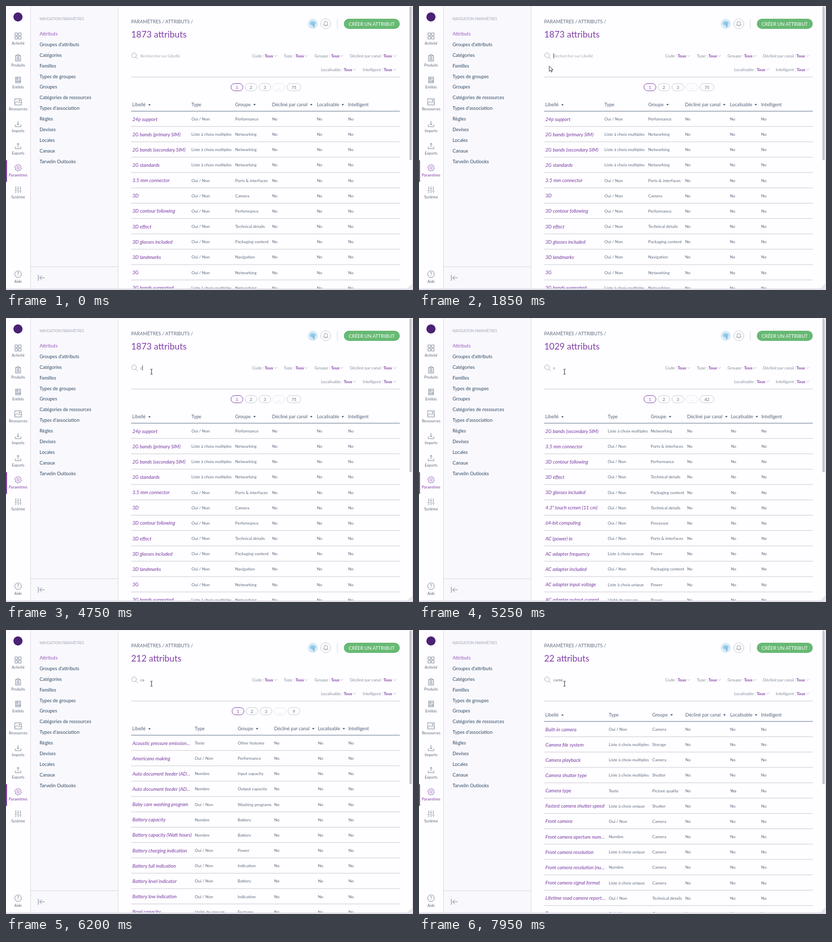
Write an HTML page that moves like this. It is 800 px wide and 558 px high and loops after 8 s.

```html
<!DOCTYPE html>
<html lang="fr">
<head>
<meta charset="utf-8">
<title>Attributs</title>
<style>
  html, body { margin: 0; width: 100%; height: 100%; overflow: hidden; background: #fefdff; }
  svg { display: block; width: 800px; height: 558px; font-family: Lato, "Open Sans", sans-serif; }
</style>
</head>
<body>
<svg id="stage" viewBox="0 0 800 558" xmlns="http://www.w3.org/2000/svg"></svg>
<script>
const NAVY = '#2f4a62', GREY = '#5f6d81', PALE = '#a3abb8', PURPLE = '#8040a8', RULE = '#c9cad3';

const text = (x, y, s, size, fill, attrs = '') =>
  `<text x="${x}" y="${y}" font-size="${size}" fill="${fill}" ${attrs}>${s}</text>`;
const rect = (x, y, w, h, fill, attrs = '') =>
  `<rect x="${x}" y="${y}" width="${w}" height="${h}" fill="${fill}" ${attrs}/>`;
const path = (d, stroke, width = 1, attrs = '') =>
  `<path d="${d}" fill="none" stroke="${stroke}" stroke-width="${width}" ${attrs}/>`;
const circle = (x, y, r, fill, attrs = '') =>
  `<circle cx="${x}" cy="${y}" r="${r}" fill="${fill}" ${attrs}/>`;
const MIDDLE = 'text-anchor="middle"';

// Icons are drawn around their own centre
const gear = Array.from({ length: 32 }, (_, i) => {
  const a = (i + .5) / 32 * Math.PI * 2, r = i % 4 < 2 ? 6.6 : 5.2;
  return (r * Math.cos(a)).toFixed(1) + ' ' + (r * Math.sin(a)).toFixed(1);
}).join('L');
const tray = 'M-5.5 1.5V5.5H5.5V1.5';
const menu = [
  ['Activité', 'M-6-6h5v5h-5zM1-6h5v5h-5zM-6 1h5v5h-5zM1 1h5v5h-5z'],
  ['Produits', 'M-2-5H-5V6H5V-5H2M-2-6.5H2V-3.5H-2zM-3-1H3M-3 1.3H3M-3 3.6H3'],
  ['Entités', 'M-5-5.5H5V5.5H-5zM-3-3.5h2.5v2.5h-2.5zM1-3.5H3.5M1-1H3.5M-3 1.5h2v2h-2zM1 1.5h2.5v2H1z'],
  ['Ressources', 'M-6.5-6H6.5V6H-6.5zM-6.5 3L-2-1 1 2 3.5 0 6.5 3M2-3.5h1.5v1.5H2z'],
  ['Imports', tray + 'M0-5.5V2M-2.5-.5L0 2 2.5-.5'],
  ['Exports', tray + 'M0 2.5V-5M-2.5-2.5L0-5 2.5-2.5'],
  ['Paramètres', `M${gear}ZM2.3 0A2.3 2.3 0 1 1-2.3 0A2.3 2.3 0 1 1 2.3 0`],
  ['Système', 'M-4.5-6.5V0M-4.5 3V6.5M-6.5 1.5H-2.5M0-6.5V-4M0-1V6.5M-2-2.5H2M4.5-6.5V1M4.5 4V6.5M2.5 2.5H6.5'],
];
const nav = ['Attributs', "Groupes d'attributs", 'Catégories', 'Familles', 'Types de groupes', 'Groupes',
  'Catégories de ressources', "Types d'association", 'Règles', 'Devises', 'Locales', 'Canaux', 'Tarvelin Outlooks'];
const filters = [
  ['Code', 484, 508.5, 530, 101], ['Type', 546, 569, 590, 101], ['Groupe', 606.5, 639, 660, 101],
  ['Décliné par canal', 676, 742, 764, 101], ['Localisable', 619.5, 664, 685, 128], ['Intelligent', 701.5, 742.5, 764, 128],
];

function sidebar() {
  const item = ([label, d], y) => {
    const color = label === 'Paramètres' ? PURPLE : GREY;
    return path(d, color, .8, `transform="translate(23.7 ${y})"`) + text(23.8, y + 16.8, label, 7.4, color, MIDDLE);
  };
  return rect(48, 0, 172, 556, '#f9f8fd')
    + path('M48.3 0V556M220.3 0V556M48 512.3H220', '#d9d7e0')
    + circle(23.5, 21.5, 9, '#4b2173')
    + rect(0, 303, 2, 42.5, PURPLE)
    + menu.map((m, i) => item(m, 59 + 43.15 * i)).join('')
    + circle(23.7, 527, 6.5, 'none', `stroke="${GREY}" stroke-width=".8"`)
    + text(23.7, 530.2, '?', 9, GREY, MIDDLE) + text(23.8, 544, 'Aide', 7.4, GREY, MIDDLE)
    + text(66, 28.4, 'NAVIGATION PARAMÈTRES', 6.875, PALE)
    + nav.map((s, i) => text(66, 57.8 + 20.93 * i, s, 9.3, i ? NAVY : '#9a58be')).join('')
    + path('M63.5 528V540M76 534H66M70.5 529.5L66 534L70.5 538.5', GREY, .8);
}

function header() {
  const filter = ([name, x, tx, cx, y]) => text(x, y, name + ' :', 8.125, '#828d9e')
    + text(tx, y, 'Tous', 8, PURPLE, 'font-weight="700"')
    + path(`M${cx - 3} ${y - 4.6}l3 3 3-3`, PALE, .8);
  return text(246, 33.8, 'PARAMÈTRES / ATTRIBUTS /', 9.2, GREY)
    + circle(603, 35, 10, '#d6ebf7')
    + `<ellipse cx="603" cy="34" rx="5.5" ry="4" fill="#8fc6e5"/>` + rect(603.5, 36, 2.6, 5.5, '#7ab5d8')
    + circle(628.5, 35, 9.8, 'none', `stroke="${RULE}"`)
    + path('M624 37.8H633L631.8 36V33.5A3.3 3.3 0 0 0 625.2 33.5V36ZM627.3 39.5H629.7', GREY, .7)
    + path('M651.3 25.5V45', '#d5d5de')
    + rect(664, 25, 110, 20, '#67b974', 'rx="10"')
    + text(718.8, 38.5, 'CRÉER UN ATTRIBUT', 9.3, '#fff', MIDDLE)
    + circle(251.7, 96.8, 4.6, 'none', `stroke="${PALE}"`) + path('M255 100.2L259 104.2', PALE)
    + filters.map(filter).join('')
    + path('M246 139.5H774', RULE);
}

const types = { O: 'Oui / Non', M: 'Liste à choix multiples', U: 'Liste à choix unique', T: 'Texte', N: 'Nombre', D: 'Unité de mesure' };
const narrow = [364.5, 450.5, 523, 611, 672.5], wide = [371, 455.5, 527, 613, 673], mid = [373, 458.5, 523.5, 611.5, 672.5];

// Each result: time shown, count, pages, column places, rows of "label|type|group"
const results = [
  { at: 0, count: 1873, pages: [1, 2, 3, '...', 75], cols: narrow, rows: `24p support|O|Performance
2G bands (primary SIM)|M|Networking
2G bands (secondary SIM)|M|Networking
2G standards|M|Networking
3.5 mm connector|O|Ports &amp; interfaces
3D|O|Camera
3D contour following|O|Performance
3D effect|O|Technical details
3D glasses included|O|Packaging content
3D landmarks|O|Navigation
3G|O|Networking
3G bands supported|M|Networking` },
  { at: 5200, count: 1029, pages: [1, 2, 3, '...', 42], cols: wide, rows: `2G bands (secondary SIM)|M|Networking
3.5 mm connector|O|Ports &amp; interfaces
3D contour following|O|Performance
3D effect|O|Technical details
3D glasses included|O|Packaging content
4.3" touch screen (11 cm)|O|Technical details
64-bit computing|O|Processor
AC (power) in|O|Ports &amp; interfaces
AC adapter frequency|U|Power
AC adapter included|O|Packaging content
AC adapter input voltage|U|Power
AC adapter output current|D|Power` },
  { at: 6100, count: 212, pages: [1, 2, 3, '...', 9], cols: wide, rows: `Acoustic pressure emission…|T|Other features
Americano making|O|Performance
Auto document feeder (AD…|N|Input capacity
Auto document feeder (AD…|N|Output capacity
Baby care washing program|O|Washing programs
Battery capacity|N|Battery
Battery capacity (Watt hours)|N|Battery
Battery charging indication|O|Power
Battery full indication|O|Indication
Battery level indicator|O|Battery
Battery low indication|O|Indication
Bowl capacity|D|Features` },
  { at: 7000, count: 26, pages: [1, 2], cols: mid, rows: `Built-in camera|O|Camera
Camcorder media type|M|Storage
Camcorder tape type|M|Storage
Camcorder type|U|Camera
Camera file system|M|Storage
Camera playback|M|Camera
Camera shutter type|M|Shutter
Camera type|T|Picture quality
Camper/Caravan|O|GPS type
Fastest camera shutter speed|U|Shutter
Front camera|O|Camera
Front camera aperture num…|N|Camera` },
  { at: 7950, count: 22, pages: [], cols: mid, rows: `Built-in camera|O|Camera
Camera file system|M|Storage
Camera playback|M|Camera
Camera shutter type|M|Shutter
Camera type|T|Picture quality
Fastest camera shutter speed|U|Shutter
Front camera|O|Camera
Front camera aperture num…|N|Camera
Front camera resolution|U|Camera
Front camera resolution (nu…|N|Camera
Front camera signal format|U|Camera
Lifetime road camera report…|O|Technical details
Rear camera|O|Camera` },
];

function pager(pages) {
  const width = p => p > 9 ? 28.5 : 24.4, gap = 3.1;
  let x = 511 - (pages.reduce((sum, p) => sum + width(p) + gap, 0) - gap) / 2;
  return pages.map(p => {
    const w = width(p), dots = p === '...';
    const edge = p === 1 ? PURPLE : dots ? '#e6e6ec' : RULE;
    const out = rect(x + .5, 152.4, w - 1, 14.2, 'none', `rx="7.1" stroke="${edge}"`)
      + text(x + w / 2, 162.6, p, 8.25, p === 1 ? PURPLE : dots ? RULE : GREY, MIDDLE);
    x += w + gap;
    return out;
  }).join('');
}

function table({ count, pages, cols, rows }) {
  const top = pages.length ? 0 : -27, step = 30.15;
  const down = x => `<path d="M${x - 2.5} ${192.8 + top}h5l-2.5 2.7z" fill="${NAVY}"/>`;
  const row = (line, i) => {
    const [label, type, group] = line.split('|'), y = 225 + top + i * step;
    const cells = [types[type], group, 'No', label === 'Camera type' ? 'Yes' : 'No', 'No'];
    return text(248.5, y + .5, label, 9.65, '#783aa2', 'font-style="italic"')
      + cells.map((s, c) => text(cols[c], y, s, 8.17, GREY, s === 'Yes' ? 'font-weight="700"' : '')).join('')
      + path(`M246 ${(236.7 + top + i * step).toFixed(2)}H774`, RULE);
  };
  return text(246, 62, count + ' attributs', 17.4, PURPLE) + pager(pages)
    + ['Libellé', 'Type', 'Groupe', 'Décliné par canal', 'Localisable', 'Intelligent']
      .map((s, i) => text(i ? cols[i - 1] : 248, 196.6 + top, s, 9.25, '#52637a')).join('')
    + `<path d="M279.5 ${195.1 + top}h5l-2.5-2.7z" fill="${NAVY}"/>`
    + down(cols[1] + 38) + down(cols[2] + 77) + down(cols[3] + 51)
    + path(`M246 ${206.7 + top}H774`, '#5f738a')
    + rows.split('\n').map(row).join('');
}

const stage = document.getElementById('stage');
stage.innerHTML = rect(0, 0, 800, 558, '#fefdff') + sidebar() + header()
  + results.map(r => `<g class="result">${table(r)}</g>`).join('')
  + text(264, 100.8, 'Rechercher sur Libellé', 8.125, PALE, 'id="hint"')
  + text(264, 100.8, '', 8.125, GREY, 'id="query"')
  + rect(0, 93, .9, 10, '#3c4552', 'id="caret"')
  + rect(793, 1, 4.5, 302, '#c5c4cb', 'rx="2"')
  + rect(0, 555, 800, 3, '#e1dfe7') + rect(798.5, 0, 1.5, 558, '#e1dfe7') + rect(0, 0, 800, 1, '#eeedf2')
  + path('M791 554.5L798 547.5M794.5 554.5L798 551', '#a5a4ab', .9)
  + `<path id="arrow" d="M0 0V10.5L2.5 8.2 4.2 12 5.9 11.2 4.2 7.5H7.5Z" fill="#fff" stroke="#222" stroke-width=".9"/>`
  + path('M-2-5Q0-5 0-4Q0-5 2-5M0-4V4M-2 5Q0 5 0 4Q0 5 2 5', '#222', 1, 'id="beam"');

const [hint, query, caret, arrow, beam] = ['hint', 'query', 'caret', 'arrow', 'beam'].map(id => document.getElementById(id));
const groups = [...stage.querySelectorAll('.result')];
const show = (el, on) => el.setAttribute('visibility', on ? 'visible' : 'hidden');

const keys = [4650, 5550, 6550, 7400];          // when each letter of "came" is typed
const route = [[1000, 236, 560], [1700, 256, 118], [1900, 256, 118], [2500, 286, 105.5]];

function pointer(t) {
  const i = route.findIndex(p => p[0] > t);
  if (i < 0) return route[route.length - 1].slice(1);
  if (!i) return null;
  const [a, b] = [route[i - 1], route[i]], u = (t - a[0]) / (b[0] - a[0]), e = u * u * (3 - 2 * u);
  return [a[1] + (b[1] - a[1]) * e, a[2] + (b[2] - a[2]) * e];
}

function draw(now) {
  const t = now % 8000;
  const current = results.filter(r => r.at <= t).length - 1;
  groups.forEach((g, i) => show(g, i === current));

  const typed = keys.filter(k => k <= t).length;
  query.textContent = 'came'.slice(0, typed);
  show(hint, !typed);
  const since = t - (typed ? keys[typed - 1] : 700);
  show(caret, since >= 0 && since % 1060 < 530);
  caret.setAttribute('x', 264.2 + (typed ? query.getComputedTextLength() : 0));

  const at = pointer(t), inField = at && at[1] < 112;
  show(arrow, at && !inField);
  show(beam, inField);
  if (at) [arrow, beam].forEach(el => el.setAttribute('transform', `translate(${at})`));
  requestAnimationFrame(draw);
}
requestAnimationFrame(draw);
</script>
</body>
</html>
```
